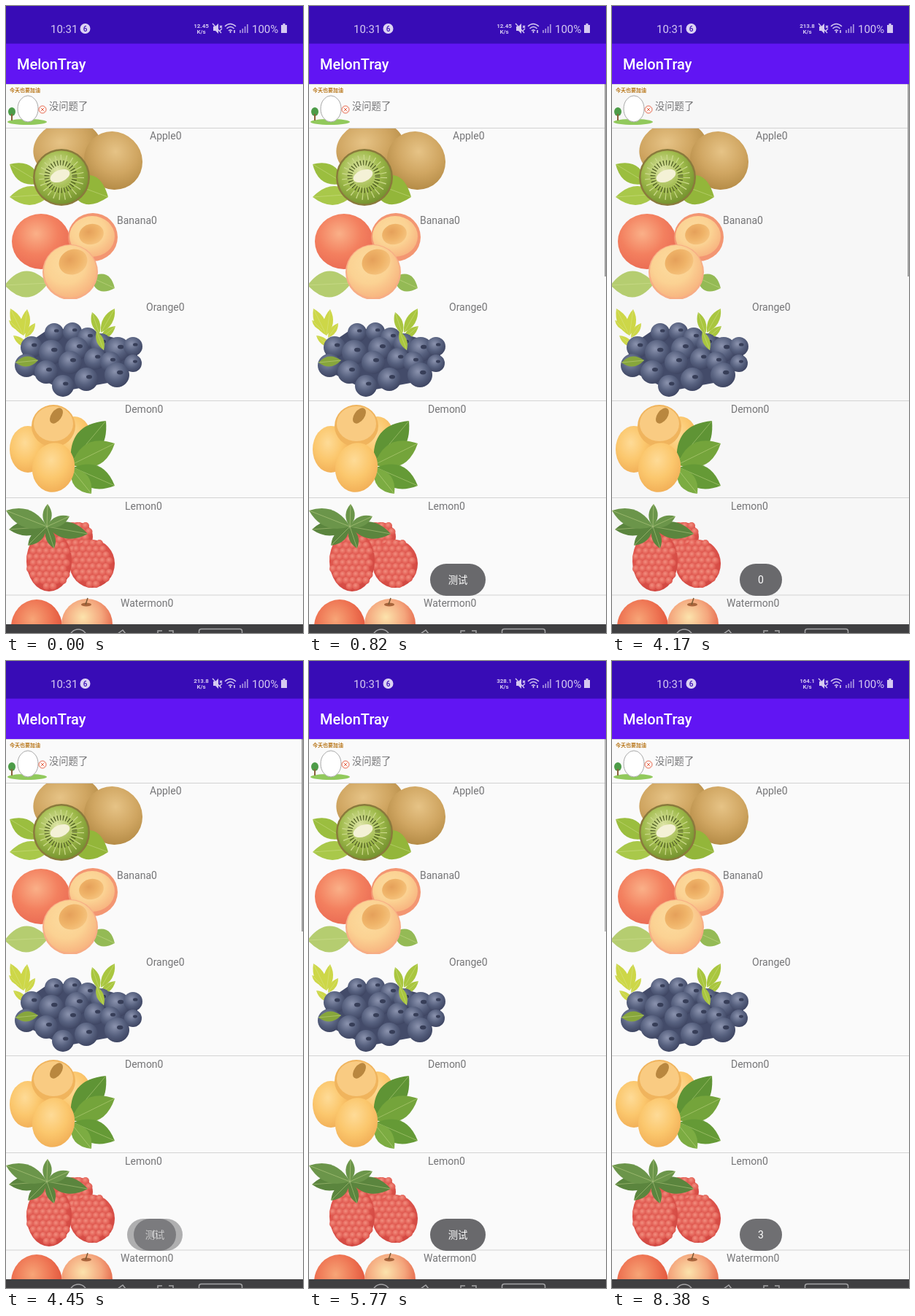
Recreate the animation shown at these times as an HTML page. Size 407 by 860 pixels, loop 8.48 s.

```html
<!DOCTYPE html>
<html lang="zh">
<head>
<meta charset="utf-8">
<title>Fruit list</title>
<style>
  html, body { margin: 0; width: 100%; height: 100%; overflow: hidden; background: #fafafa; }
  svg { display: block; width: 407px; height: 860px; }
  text { font-family: Roboto, "Noto Sans CJK SC", "Noto Sans CJK", sans-serif; font-size: 14px; }
  .label { fill: #757577; }
  .status { fill: #d5c9f1; font-size: 15px; }
  .speed { fill: #d5c9f1; font-size: 8px; font-weight: 700; text-anchor: middle; }
  .toast text { fill: #fff; text-anchor: middle; }
</style>
</head>
<body>
<svg viewBox="0 0 407 860">
  <defs id="defs"></defs>
  <rect id="page" width="407" height="860"/>
  <g id="list"></g>
  <rect id="scrollbar" x="405" y="107" width="2" height="264" fill="#a3a3a3"/>

  <rect y="106" width="407" height="2" fill="#000" opacity=".12"/>
  <rect width="407" height="52" fill="#380cb6"/>
  <rect y="51.600" width="407" height="55.400" fill="#6115f3"/>
  <text x="15" y="87" fill="#fff" style="font-size:20px;font-weight:500">MelonTray</text>

  <text class="status" x="61" y="36.500">10:31</text>
  <circle cx="108.500" cy="31" r="7" fill="#dcd3f3"/>
  <text x="108.500" y="34.500" fill="#390db5" text-anchor="middle" style="font-size:10px;font-weight:500">6</text>
  <text class="speed" id="speed" x="267.500" y="30"></text>
  <text class="speed" x="267.500" y="38">K/s</text>
  <g fill="#d5c9f1" stroke="#d5c9f1">
    <path d="M284 28h3l4-4v14l-4-4h-3z" stroke="none"/>
    <path d="M283 24l12 13M293 27l3 3m0-3l-3 3m0 4l3-3" fill="none" stroke-width="1.300"/>
    <path d="M300 28q7-7 15 0M302.500 31q5-5 10 0M305 34q2.500-2.500 5 0" fill="none" stroke-width="1.500"/>
    <path d="M307.500 34v3M313 33v4" stroke-width="1.600"/>
    <path d="M321 37v-4M324.300 37v-6M327.600 37v-9M330.900 37v-12" stroke-width="1.600" opacity=".75"/>
    <path d="M377 26h2.500v-2h3v2h2.500v11h-8z" stroke="none"/>
  </g>
  <text class="status" x="337" y="36.500">100%</text>

  <g id="toasts"></g>

  <rect y="848" width="407" height="12" fill="#3f3f41"/>
  <g fill="none" stroke="#a5a5a7" stroke-width="1.500">
    <circle cx="99" cy="867" r="12"/>
    <path d="M153 861l7-5 4 5M208 861v-4h6m9 0h6v4"/>
    <rect x="264.500" y="854.500" width="59" height="20" rx="3"/>
  </g>
</svg>

<script>
const LOOP = 8480;
const byId = id => document.getElementById(id);

// Radial shades: light, middle, edge
const shades = {
  kiwiSkin: ['#e6c386', '#d0a662', '#b38a45'],
  kiwiFlesh: ['#dfe5a8', '#9fba4b', '#718f2c'],
  peachSkin: ['#fab088', '#f3805f', '#ea6a53'],
  peachFlesh: ['#fcdc9f', '#fbd293', '#f7b27e'],
  stone: ['#e5a05a', '#efb368', '#f6c47f'],
  blueberry: ['#8b93ae', '#57617f', '#3b425f'],
  apricot: ['#fedb97', '#fbc76d', '#f1ae56'],
  raspberry: ['#ef8072', '#e0574e', '#cf4640'],
  drupelet: ['#f18f80', '#e6685d', '#da524a'],
  apple: ['#f7a577', '#ee7352', '#dd4c36'],
  blush: ['#fce3ac', '#f4a57c', '#e1593f']
};
byId('defs').innerHTML = Object.entries(shades).map(([name, [a, b, c]]) =>
  `<radialGradient id="${name}" cx=".42" cy=".36" r=".68"><stop stop-color="${a}"/>
   <stop offset=".55" stop-color="${b}"/><stop offset="1" stop-color="${c}"/></radialGradient>`).join('');

const paint = color => shades[color] ? `url(#${color})` : color;
const ball = (color, x, y, rx, ry = rx, turn = 0) =>
  `<ellipse cx="${x}" cy="${y}" rx="${rx}" ry="${ry}" fill="${paint(color)}" transform="rotate(${turn} ${x} ${y})"/>`;
const ring = (color, x, y, r, width, dash) =>
  `<circle cx="${x}" cy="${y}" r="${r}" fill="none" stroke="${color}" stroke-width="${width}" stroke-dasharray="${dash}"/>`;

// A pointed leaf from base (x1, y1) to tip (x2, y2) with a pale midrib
function leaf(color, x1, y1, x2, y2, bulge = 0.4) {
  const mx = (x1 + x2) / 2, my = (y1 + y2) / 2;
  const nx = (y1 - y2) * bulge, ny = (x2 - x1) * bulge;
  return `<path d="M${x1} ${y1}Q${mx + nx} ${my + ny} ${x2} ${y2}Q${mx - nx} ${my - ny} ${x1} ${y1}" fill="${color}"/>
    <path d="M${x1} ${y1}L${x2} ${y2}" stroke="#dce8a0" stroke-width=".8" opacity=".5"/>`;
}

const label = (text, x, y) => `<text class="label" x="${x}" y="${y}">${text}</text>`;
const divider = y => `<rect y="${y}" width="407" height="1" fill="#d3d3d3"/>`;

function header() {
  return ball('#91c95c', 29, 159, 27, 4) + ball('#4d9c48', 8, 145, 5, 6) +
    '<path d="M8 148v9" stroke="#89603a" stroke-width="2"/>' +
    '<ellipse cx="30" cy="141" rx="14" ry="18" fill="#fff" stroke="#a9a9a9"/>' +
    '<circle cx="50" cy="142" r="5" fill="#fff" stroke="#e6694e"/><path d="M47.500 139.500l5 5m0-5l-5 5" stroke="#e6694e"/>' +
    '<text x="5" y="118" fill="#b9781c" style="font-size:7px;font-weight:900">今天也要加油</text>' +
    '<text class="label" x="59" y="142" style="font-size:13.300px">没问题了</text>';
}

function kiwi() {
  return ball('kiwiSkin', 84, 196, 47, 38, -12) + ball('kiwiSkin', 147, 212, 41, 39, 45) +
    leaf('#9bbe3f', 48, 243, 5, 217, 0.5) + leaf('#a9c84a', 62, 258, 5, 262, 0.45) +
    leaf('#93b63a', 86, 242, 140, 262, 0.7) +
    ball('#8a7a3c', 76, 235, 39) + ball('kiwiFlesh', 76, 235, 36.5) +
    ring('#cbd98a', 76, 235, 22, 18, '1 5') + ring('#4c5a20', 75, 234, 19, 7, '1.200 2.800') +
    ball('#f4f1d6', 74, 233, 14, 8, -22);
}

function peach() {
  return ball('peachSkin', 48, 323, 40, 38) + ball('#f39672', 119, 317, 34, 33) +
    ball('peachFlesh', 118, 316, 31, 28) + ball('stone', 117, 313, 17, 14, -15) +
    leaf('#b5cd70', 58, 380, -2, 383, 0.6) + leaf('#94ba55', 116, 372, 149, 387, 0.65) +
    ball('#f7ad85', 88, 365, 38) + ball('peachFlesh', 88, 364, 36) + ball('stone', 92, 351, 20, 17, -25);
}

function blueberries() {
  const berries = [[66,448,13], [91,447,13], [112,455,14], [130,463,14], [153,471,17], [174,467,13],
    [174,490,12], [35,468,15], [62,475,17], [97,470,16], [122,484,15], [28,493,16], [55,502,16],
    [88,489,16], [143,488,14], [152,506,17], [110,512,16], [78,521,15]];
  let art = '<path d="M22 468L60 442L112 445L180 464L180 492L150 515L80 528L25 500Z" fill="#434b69"/>';
  for (const [x, y, tipX, tipY] of [[24,452,6,415], [24,452,29,416], [18,445,4,431], [26,455,40,435], [30,468,10,452]])
    art += leaf('#cdd748', x, y, tipX, tipY, 0.35);
  for (const [x, y, tipX, tipY] of [[128,450,118,420], [130,448,149,415], [128,458,150,439], [124,458,106,445], [132,475,122,445]])
    art += leaf('#a9c63f', x, y, tipX, tipY, 0.35);
  for (const [x, y, r] of berries)
    art += ball('blueberry', x, y, r) + ball('#373e58', x + r * 0.25, y - r * 0.2, r * 0.25, r * 0.17);
  return art + leaf('#87a63c', 13, 489, 44, 486, 0.45) + leaf('#a9c63f', 134, 472, 124, 446, 0.35);
}

function apricots() {
  return ball('apricot', 94, 597, 24, 34) + ball('apricot', 30, 608, 25, 32) +
    ball('#f0b45d', 65, 576, 30, 29) + ball('#f9cb82', 65, 573, 27, 24) + ball('#b9873f', 69, 562, 7, 12, 35) +
    leaf('#5f9435', 89, 626, 137, 569, 0.5) + leaf('#74a43b', 90, 629, 149, 600, 0.5) +
    leaf('#659a36', 92, 633, 149, 658, 0.5) + leaf('#7cac42', 89, 634, 117, 669, 0.5) +
    ball('apricot', 65, 633, 29, 34, 10);
}

function raspberry(cx, cy, rx, ry) {
  let art = ball('raspberry', cx, cy, rx, ry);
  for (let row = 0, y = -ry + 5; y < ry - 2; y += 8, row++)
    for (let x = -rx + 5 + row % 2 * 4.5; x < rx - 3; x += 9)
      if ((x / rx) ** 2 + (y / ry) ** 2 < 0.85) art += ball('drupelet', cx + x, cy + y, 5);
  return art;
}

function raspberries() {
  let art = raspberry(98, 728, 21, 20) + raspberry(118, 765, 31, 33) + raspberry(59, 761, 31, 42);
  for (const [x, y] of [[4,718], [30,740], [112,724], [66,744], [0,692], [87,700], [57,683]])
    art += leaf(y < 710 ? '#6b954a' : '#5b853e', 56, 714, x, y, 0.4);
  return art;
}

function apples() {
  return ball('apple', 42, 852, 35, 38) + ball('blush', 111, 848, 35, 35) +
    ball('#a9653c', 110, 821, 7, 2.5) + '<path d="M109 821l3-9" stroke="#7a5a35" stroke-width="1.500"/>';
}

const rows = [
  [kiwi, 167, 108], [peach, 283, 119], [blueberries, 404, 136],
  [apricots, 543, 130], [raspberries, 675, 132], [apples, 809, 39]
];
byId('defs').innerHTML += rows.map(([, y, h], i) =>
  `<clipPath id="row${i}"><rect y="${y}" width="200" height="${h}"/></clipPath>`).join('');
byId('list').innerHTML = header() +
  rows.map(([draw], i) => `<g clip-path="url(#row${i})">${draw()}</g>`).join('') +
  [167, 541, 674, 807.5].map(divider).join('') +
  label('Apple0', 197, 183) + label('Banana0', 152, 299) + label('Orange0', 192, 418) +
  label('Demon0', 163, 557.5) + label('Lemon0', 163, 690.5) + label('Watermon0', 157, 824);

// Fade-in and fade-out spans of each toast
const toasts = [
  { text: '测试', width: 76, enter: [250, 700], leave: [2300, 2700] },
  { text: '0', width: 58, enter: [2350, 2800], leave: [4300, 4850] },
  { text: '测试', width: 76, enter: [4230, 4660], leave: [6150, 6600] },
  { text: '3', width: 58, enter: [6200, 6750], leave: [8360, 8860] }
];
byId('toasts').innerHTML = toasts.map(({ text, width }) =>
  `<g class="toast"><rect x="${204 - width / 2}" y="765" width="${width}" height="44" rx="22" fill="#69696c"/>
   <text x="204" y="792" style="font-size:${width > 60 ? 13.3 : 14}px">${text}</text></g>`).join('');
const toastNodes = [...document.querySelectorAll('.toast')];

const speeds = [[7840, '164.1'], [4840, '328.1'], [1840, '213.8'], [0, '12.45']];
const presses = [{ at: 150, fade: [1640, 1940] }, { at: 4170, fade: [5690, 5990] }];
const ramp = (t, [start, end]) => Math.min(1, Math.max(0, (t - start) / (end - start)));

function render(t) {
  toasts.forEach(({ enter, leave }, i) =>
    toastNodes[i].setAttribute('opacity', ramp(t, enter) * (1 - ramp(t, leave))));
  byId('speed').textContent = speeds.find(([start]) => t >= start)[1];
  const press = presses.findLast(({ at }) => t >= at);
  byId('scrollbar').setAttribute('opacity', press ? 1 - ramp(t, press.fade) : 0);
  byId('page').setAttribute('fill', press && t < press.at + 150 ? '#f7f7f7' : '#fafafa');
}

function tick() {
  render(performance.now() % LOOP);
  requestAnimationFrame(tick);
}
tick();
</script>
</body>
</html>
```
